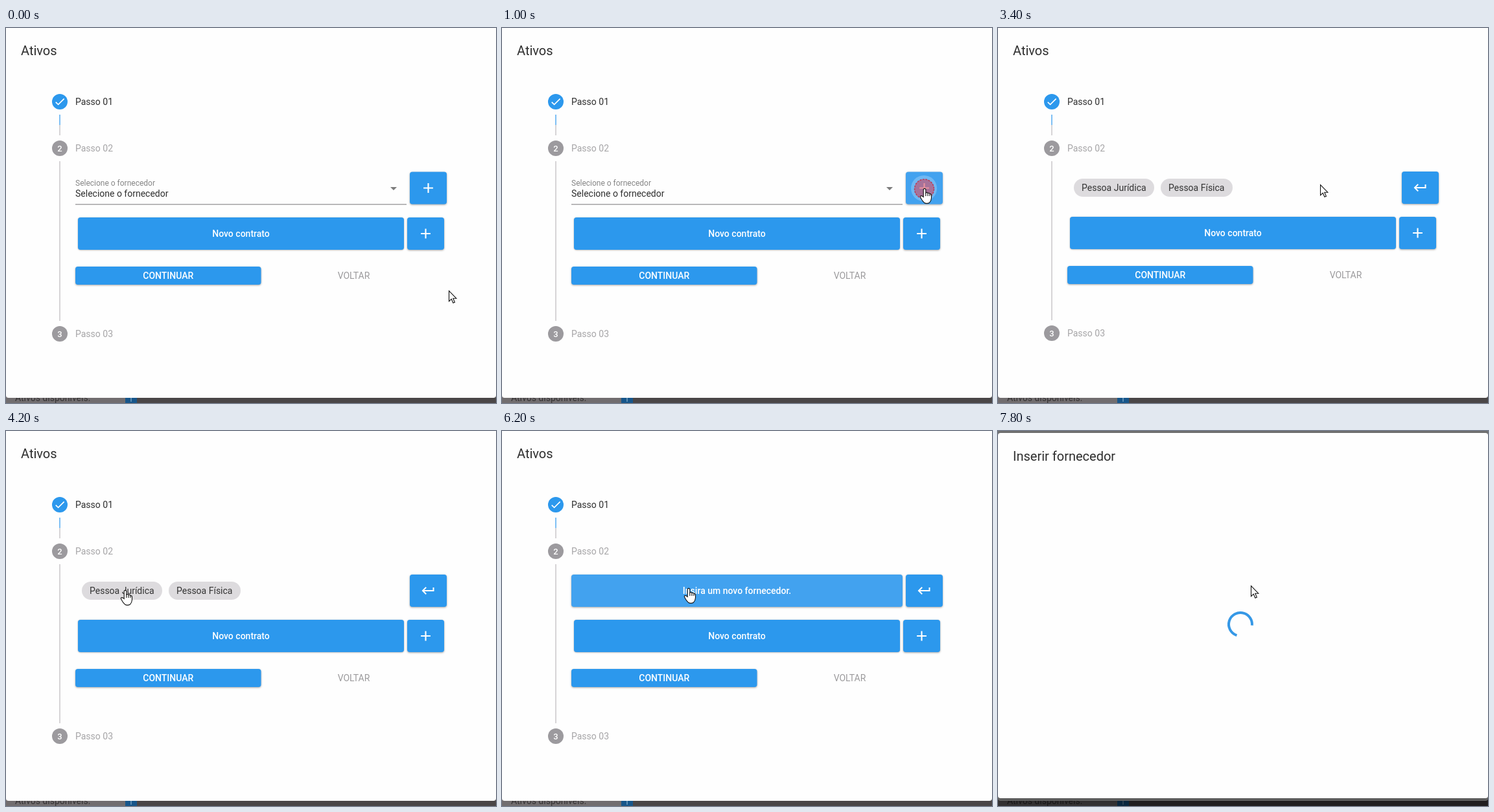
An HTML page with a canvas for the animation above (8000 ms loop, 756 px wide and 580 px high).

```html
<!DOCTYPE html>
<html lang="pt">
<head>
<meta charset="utf-8">
<title>Ativos</title>
<style>
html, body { margin: 0; width: 100%; height: 100%; overflow: hidden; background: #fefefe; }
canvas { display: block; width: 756px; height: 580px; }
</style>
</head>
<body>
<canvas id="stage" width="756" height="580"></canvas>
<script>
const ctx = document.getElementById('stage').getContext('2d');
const LOOP = 8000, TICK = 200;
const PAPER = '#fefefe', BLUE = '#2c98ed', HOVER = '#42a2ef', GRAY = '#9c9a9e', INK = '#2e2e2e', FADED = '#a6a5a7';

const ICONS = {
  add: new Path2D('M19 13h-6v6h-2v-6H5v-2h6V5h2v6h6z'),
  back: new Path2D('M19 7v4H5.83l3.58-3.59L8 6l-6 6 6 6 1.41-1.41L5.83 13H21V7z'),
  check: new Path2D('M9 16.17L4.83 12l-1.42 1.41L9 19 21 7l-1.41-1.41z')
};
const ARROW = new Path2D('M.5 .5V16.7L4.2 13.2L6.9 19.3L9.4 18.2L6.8 12.2H11.8Z');
const HAND = new Path2D('M-1.8 1.6Q0 -.8 1.8 1.6V7Q4 5.5 5 7.6Q7.2 6.6 8 8.6Q10.5 8.2 10.5 11V15Q10.3 19 7.5 22.2Q3 24.6 -.5 22.2Q-3 20 -5 16.4Q-7 13.7 -6.6 12.2Q-5 10.4 -1.8 13.4Z');
const FINGERS = new Path2D('M1.8 7V12M5 7.6V12M8 8.6V12');

// Pointer moves: start, end, x0, y0, x1, y1
const MOVES = [
  [0, 600, 683, 406, 651, 248],
  [3400, 4200, 497, 242, 183, 246],
  [5800, 6600, 183, 246, 390, 239]
];
const CLICKS = [800, 4800, 6800];

const clamp = v => Math.max(0, Math.min(1, v));
const easeInOut = p => p * p * (3 - 2 * p);
const easeOut = p => 1 - Math.pow(1 - p, 1.8);

function text(str, x, y, size = 14, color = INK, weight = 400, align = 'left') {
  ctx.font = `${weight} ${size}px Roboto, sans-serif`;
  ctx.textAlign = align;
  ctx.fillStyle = color;
  ctx.fillText(str, x, y);
}

function rounded(x, y, w, h, r) {
  ctx.beginPath();
  ctx.roundRect(x, y, w, h, r);
}

function box(x, y, w, h, color, r = 4, lift = 1) {
  ctx.save();
  if (lift) {
    ctx.shadowColor = 'rgba(0,0,0,.36)';
    ctx.shadowBlur = 1 + lift * 2;
    ctx.shadowOffsetY = lift;
  }
  ctx.fillStyle = color;
  rounded(x, y, w, h, r);
  ctx.fill();
  ctx.restore();
}

function disc(x, y, r, color) {
  ctx.fillStyle = color;
  ctx.beginPath();
  ctx.arc(x, y, r, 0, Math.PI * 2);
  ctx.fill();
}

function icon(name, x, y, scale = 1) {
  ctx.save();
  ctx.translate(x, y);
  ctx.scale(scale, scale);
  ctx.translate(-12, -12);
  ctx.fillStyle = '#fff';
  ctx.fill(ICONS[name]);
  ctx.restore();
}

function rect(x, y, w, h, color) {
  ctx.fillStyle = color;
  ctx.fillRect(x, y, w, h);
}

function button(label, x, y, w, h, color = BLUE, lift = 1) {
  box(x, y, w, h, color, 4, lift);
  text(label, x + w / 2, y + h / 2 + 5, 14, '#fff', 500, 'center');
}

function ripple(x, y, r, area, alpha) {
  ctx.save();
  rounded(...area, 4);
  ctx.clip();
  disc(x, y, r, `rgba(255,255,255,${alpha})`);
  ctx.restore();
}

function backdrop() {
  rect(0, 560, 756, 20, '#4a4647');
  rect(0, 560, 184, 20, '#716d6f');
  rect(184, 560, 18, 20, '#17568a');
  rect(192, 572, 2, 6, '#5d8db2');
  text('Ativos disponíveis:', 14, 577, 14, '#353233');
  ctx.fillStyle = PAPER;
  rounded(0, -10, 756, 582, 4);
  ctx.fill();
}

function step(n, y, done) {
  disc(83, y, 12, done ? BLUE : GRAY);
  if (done) icon('check', 83, y, .8);
  else text(n, 83, y + 4.6, 13, '#fff', 500, 'center');
  text('Passo 0' + n, 107, y + 5, 14, done ? INK : FADED);
}

function stepper(dy) {
  step(1, 114, true);
  rect(82, 134, 2, 16, '#7fc0f4');
  rect(82, 150, 2, 16, '#d6d4d7');
  step(2, 186);
  rect(82, 206, 2, 246 + dy, '#d6d4d7');
  step(3, 472 + dy);
}

function select() {
  text('Selecione o fornecedor', 107, 244, 12, '#858585');
  text('Selecione o fornecedor', 107, 261);
  rect(107, 272, 511, 1.5, '#a3a2a4');
  ctx.fillStyle = '#7c7c7c';
  ctx.beginPath();
  ctx.moveTo(593, 246);
  ctx.lineTo(603, 246);
  ctx.lineTo(598, 251);
  ctx.fill();
}

function chip(label, x, w, active) {
  box(x, 233, w, 28, active ? '#c8c5ca' : '#dddbde', 14, active ? 3 : 0);
  text(label, x + 12, 252, 14, '#333');
}

function chips(t) {
  chip('Pessoa Jurídica', 117, 124, t >= 4800);
  chip('Pessoa Física', 251, 111);
}

function supplierButton(t, over) {
  const pressed = t >= 6800 && t < 7400;
  const area = [107, 222, 511, 50];
  box(...area, pressed ? '#66b2f4' : over ? HOVER : BLUE, 4, pressed ? 4 : 1);
  if (pressed) ripple(383.5, 246, 30 + (t - 6800) * .465, area, t < 7200 ? .26 : .12);
  text('Insira um novo fornecedor.', 362.5, 252, 14, '#fff', 500, 'center');
}

function form(t, p) {
  const dy = t < 1400 ? 1 : 0;
  const y = 222 + dy / 2;
  text('Ativos', 23, 42, 20);
  stepper(dy);

  if (t < 1400) select();
  else if (t < 5400) chips(t);
  else supplierButton(t, p.hand);

  const hot = p.hand && p.x > 622;
  box(623, y, 57, 50, hot ? HOVER : BLUE);
  if (t >= 1000 && t < 1400) ripple(651, 248, (t - 800) * .1, [623, y, 57, 50], .24);
  icon(t < 1400 ? 'add' : 'back', 651.5, y + 25, t < 1400 ? 1.06 : 1);

  button('Novo contrato', 111, 292 + dy, 503, 50, BLUE, .6);
  box(619, 292 + dy, 57, 50, BLUE);
  icon('add', 647.5, 317 + dy, 1.06);
  button('CONTINUAR', 107, 368 + dy, 286.5, 28);
  text('VOLTAR', 536.5, 387 + dy, 14, '#9b9a9c', 400, 'center');
}

function spinner(t) {
  const rad = Math.PI / 180;
  const k = (7800 - t) / 200;
  ctx.strokeStyle = '#3598e6';
  ctx.lineWidth = 4;
  ctx.beginPath();
  ctx.arc(374, 299, 18, (108 - 95 * k) * rad, (365 - 150 * k) * rad);
  ctx.stroke();
}

function dialog(t) {
  const open = clamp((t - 7200) / 400);
  const scale = .7 + .3 * easeOut(open);
  rect(0, 0, 756, 580, `rgba(0,0,0,${.55 * open})`);
  ctx.save();
  ctx.globalAlpha = open;
  ctx.translate(378, 285.5);
  ctx.scale(scale, scale);
  ctx.translate(-378, -285.5);
  box(0, 3, 756, 565, PAPER, 4, 2);
  text('Inserir fornecedor', 23, 46, 20);
  if (open === 1) spinner(t);
  ctx.restore();
}

function pointer(t) {
  let x, y;
  for (const [start, end, x0, y0, x1, y1] of MOVES) {
    if (t < start) break;
    const ease = start === 3400 ? easeOut : easeInOut;
    const p = ease(clamp((t - start) / (end - start)));
    x = x0 + (x1 - x0) * p;
    y = y0 + (y1 - y0) * p;
  }
  const inside = (a, b) => x >= a && x <= b;
  const onRow = y >= 222 && y <= 272 && t < 7400;
  const onTarget = inside(623, 680) ||
    (t >= 5400 ? inside(107, 618) : t >= 1400 && (inside(117, 241) || inside(251, 362)));
  return { x, y, hand: onRow && onTarget };
}

function clickMark(t, p) {
  const start = CLICKS.find(c => t >= c && t < c + 600);
  if (start === undefined || t >= 7400) return;
  const age = t - start;
  const r = age === 0 ? 4 : 15;
  ctx.save();
  ctx.globalAlpha = age === 0 ? 1 : age === 200 ? .8 : age === 400 ? .12 : 0;
  disc(p.x + .5, p.y + 1, r, age ? 'rgba(215,55,75,.68)' : '#e8404e');
  ctx.strokeStyle = '#c5283c';
  ctx.lineWidth = 1.5;
  ctx.setLineDash([3, 1.5]);
  ctx.stroke();
  ctx.restore();
}

function drawPointer(p) {
  ctx.save();
  ctx.translate(Math.round(p.x) + (p.hand ? 1 : 0), Math.round(p.y));
  ctx.fillStyle = '#fff';
  ctx.strokeStyle = '#111';
  ctx.lineWidth = 1.1;
  const shape = p.hand ? HAND : ARROW;
  ctx.fill(shape);
  ctx.stroke(shape);
  if (p.hand) ctx.stroke(FINGERS);
  ctx.restore();
}

function draw(t) {
  const p = pointer(t);
  rect(0, 0, 756, 580, PAPER);
  const blank = t >= 800 && t < 1000;
  if (!blank) {
    backdrop();
    form(t, p);
    if (t >= 7400) dialog(t);
  }
  clickMark(t, p);
  drawPointer(p);
}

const origin = performance.now();
function loop() {
  const t = (performance.now() - origin) % LOOP;
  draw(Math.floor(t / TICK) * TICK);
  requestAnimationFrame(loop);
}
loop();
</script>
</body>
</html>
```
